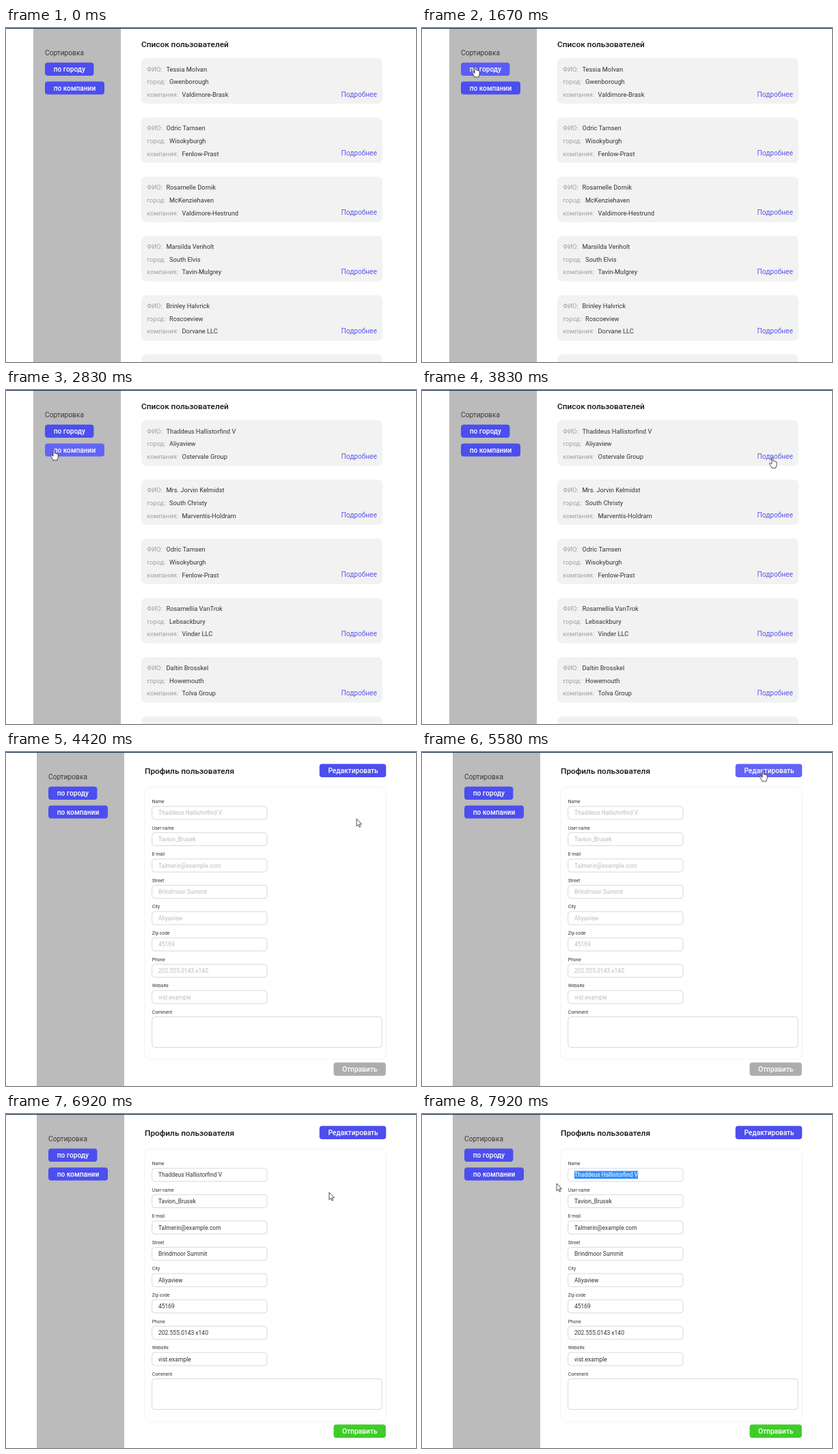
These frames come from a looping animation (600 by 490 pixels, 8000 ms). An HTML page:

```html
<!DOCTYPE html>
<html lang="ru">
<head>
<meta charset="utf-8">
<title>Список пользователей</title>
<style>
html, body { margin: 0; width: 100%; height: 100%; overflow: hidden; background: #fff; }
svg { display: block; width: 100%; height: 100%; font-family: Roboto, Arial, sans-serif; }
text { white-space: pre; }
</style>
</head>
<body>
<svg id="stage" viewBox="0 0 600 490"></svg>
<script>
const LOOP = 8000;
const T = { show: 500, byCity: 1750, byCompany: 2620, open: 4330, edit: 5720, drag: 7600 };
const BLUE = [76, 78, 239], LIGHT = [98, 100, 246], GREY = [173, 173, 173], GREEN = [63, 204, 41];
const NS = "http://www.w3.org/2000/svg";
const stage = document.getElementById("stage");

function add(parent, tag, attrs, content) {
  const node = document.createElementNS(NS, tag);
  for (const key in attrs) node.setAttribute(key, attrs[key]);
  if (content !== undefined) node.textContent = content;
  parent.appendChild(node);
  return node;
}
const box = (p, x, y, width, height, rx, fill, more) =>
  add(p, "rect", { x, y, width, height, rx, fill, ...more });
const label = (p, x, y, size, fill, str, weight = 400) =>
  add(p, "text", { x, y, "font-size": size, fill, "font-weight": weight }, str);
const show = (node, on) => node.setAttribute("display", on ? "inline" : "none");
const mix = (a, b, k) => `rgb(${a.map((v, i) => Math.round(v + (b[i] - v) * k))})`;
const clamp = v => Math.max(0, Math.min(1, v));

// Buttons keep their hit area for the pointer
function button(p, x, y, w, h, str) {
  const rect = box(p, x, y, w, h, 4, mix(BLUE, BLUE, 0));
  label(p, x + 12.7, y + h / 2 + 3.6, 10.15, "#fff", str, 500);
  return { rect, x, y, w, h };
}

function sidebar(p, x) {
  box(p, x, 0, 128, 490, 0, "#bbb");
  label(p, x + 17, 39.7, 10.2, "#3a3a3a", "Сортировка");
  return [
    button(p, x + 17, 50.8, 71.4, 19.2, "по городу"),
    button(p, x + 17, 78.4, 87, 19.2, "по компании")
  ];
}

const users = [
  ["Tessia Molvan", "Gwenborough", "Valdimore-Brask"],
  ["Odric Tamsen", "Wisokyburgh", "Fenlow-Prast"],
  ["Rosamelle Dornik", "McKenziehaven", "Valdimore-Hestrund"],
  ["Marsilda Venholt", "South Elvis", "Tavin-Mulgrey"],
  ["Brinley Halvrick", "Roscoeview", "Dorvane LLC"],
  ["Mrs. Jorvin Kelmidst", "South Christy", "Marventis-Holdram"],
  ["Daltin Brosskel", "Howemouth", "Tolva Group"],
  ["Thaddeus Hallistorfind V", "Aliyaview", "Ostervale Group"],
  ["Mirtha Kolvenby", "Bartholomebury", "Trel and Sons"],
  ["Rosamellia VanTrok", "Lebsackbury", "Vinder LLC"]
];
const orders = [[0, 1, 2, 3, 4], [7, 8, 0, 6, 9], [7, 5, 1, 9, 6]];

// User list
const list = add(stage, "g", {});
const listButtons = sidebar(list, 40);
label(list, 198, 28.2, 11.8, "#111", "Список пользователей", 500);
const rows = [["ФИО:", 234.5], ["город:", 239], ["компания:", 257.5]];
const links = [], cells = [];
for (let i = 0; i < 6; i++) {
  const y = 44.3 + 86.9 * i;
  box(list, 198, y, 353, 66.8, 7, "#f2f2f2");
  if (i === 5) break;
  cells.push(rows.map(([name, x], r) => {
    const base = y + 19.2 + 18.6 * r;
    label(list, 206.3, base, 9.3, "#a0a0a0", name);
    return label(list, x, base, 9.3, "#333", "");
  }));
  label(list, 490.5, y + 56.2, 10.15, "#5a58ec", "Подробнее");
  links.push({ x: 490, y: y + 46, w: 53, h: 14 });
}

// User profile
const profile = add(stage, "g", {});
const profileButtons = sidebar(profile, 45);
label(profile, 203, 31.6, 11.8, "#111", "Профиль пользователя", 500);
profileButtons.push(button(profile, 458.7, 17.6, 97.5, 19.4, "Редактировать"));
const send = button(profile, 479.4, 455.6, 76.4, 19.4, "Отправить").rect;
const frame = (x, y, w, h, r, stroke) =>
  box(profile, x, y, w, h, r, "#fff", { stroke, "stroke-width": 0.8 });
frame(203, 51.5, 353, 399.5, 8, "#efefef");
const form = [
  ["Name", users[7][0]],
  ["User name", "Tavion_Brusek"],
  ["E-mail", "Talmerin@example.com"],
  ["Street", "Brindmoor Summit"],
  ["City", "Aliyaview"],
  ["Zip code", "45169"],
  ["Phone", "202.555.0143 x140"],
  ["Website", "vist.example"]
];
const fields = [];
const values = form.map(([name, value], i) => {
  const y = 79.7 + 38.6 * i;
  label(profile, 213.8, y - 4.7, 6.7, "#333", name);
  frame(213.7, y, 168.2, 19.2, 4, "#cfcfcf");
  fields.push({ x: 213.7, y, w: 168.2, h: 19.2 });
  return label(profile, 223, y + 12.7, 8.5, "#bbb", value);
});
label(profile, 213.8, 383.8, 6.7, "#333", "Comment");
frame(213.7, 388.6, 336.4, 44.8, 4, "#cfcfcf");

// Text selection in the first field
const picked = add(profile, "g", {});
const clip = box(add(picked, "clipPath", { id: "pick" }), 0, 83.5, 0, 11.5, 0, "#000");
const mark = box(picked, 0, 83.5, 0, 11.5, 0, "#3390fb");
add(picked, "g", { "clip-path": "url(#pick)" })
  .appendChild(values[0].cloneNode(true)).setAttribute("fill", "#fff");

box(stage, 0, 0, 600, 1.1, 0, "#1d3050");

// Pointer
const pointer = add(stage, "g", { "stroke-linejoin": "round" });
const shapes = {
  arrow: add(pointer, "path", {
    d: "M0 0V10.8L2.5 8.5L4.1 12.2L5.8 11.5L4.2 7.9H7.6Z",
    fill: "#fff", stroke: "#222", "stroke-width": 0.8
  }),
  hand: add(pointer, "path", {
    d: "M-1 .8C-1-.3 1-.3 1 .8V6C1.2 5.3 2.8 5.5 2.8 6.4C3.2 5.8 4.5 6 4.5 7C5 6.5 6.2 6.8 6.2 7.8V11C6.2 13.5 5 14 5 16H-1.2C-1.5 14-4 11.5-4.4 9.6C-4.5 8.4-3.2 8.2-2.4 9L-1 10.4Z",
    fill: "#fff", stroke: "#222", "stroke-width": 0.8
  }),
  beam: add(pointer, "path", {
    d: "M-2-5H-.6L0-4.4L.6-5H2M0-4.4V4.4M-2 5H-.6L0 4.4L.6 5H2",
    fill: "none", stroke: "#222", "stroke-width": 0.8
  })
};

// Pointer path: time, x, y
const path = [
  [500, 395, 325], [830, 20, 232], [1080, 20, 232], [1250, 12, 180],
  [1450, 48, 90], [1600, 78, 56], [1920, 78, 56], [2400, 70, 87],
  [2830, 70, 87], [3150, 235, 226], [3500, 470, 160], [3850, 513, 98],
  [4600, 513, 98], [5050, 519, 58], [5460, 499, 27], [6250, 499, 27],
  [6600, 492, 88], [6920, 473, 115], [7150, 400, 112], [7480, 317, 90],
  [7600, 317, 90], [7830, 281, 92], [7920, 197, 102], [8000, 197, 102]
];

function slope(i, c) {
  const a = path[i - 1], b = path[i], d = path[i + 1];
  if (!a || !d) return 0;
  const before = (b[c] - a[c]) / (b[0] - a[0]), after = (d[c] - b[c]) / (d[0] - b[0]);
  return before * after <= 0 ? 0 : 2 * before * after / (before + after);
}

function position(t) {
  if (t <= path[0][0]) return path[0].slice(1);
  const i = path.findIndex((p, n) => n < path.length - 1 && t <= path[n + 1][0]);
  const a = path[i], b = path[i + 1], span = b[0] - a[0], u = (t - a[0]) / span;
  return [1, 2].map(c =>
    a[c] * (1 + 2 * u) * (1 - u) ** 2 + b[c] * u * u * (3 - 2 * u) +
    span * u * (1 - u) * (slope(i, c) * (1 - u) - slope(i + 1, c) * u));
}

const inside = ([x, y], r) => x >= r.x && x <= r.x + r.w && y >= r.y && y <= r.y + r.h;

// Share of the last 240 ms spent over the button, as its hover fade
function hover(t, r) {
  let sum = 0;
  for (let k = 0; k < 12; k++) sum += inside(position(t - 20 * k), r);
  return sum / 12;
}

let lastOrder = -1;
function draw(t) {
  const open = t >= T.open, editing = t >= T.edit;
  show(list, !open);
  show(profile, open);

  const order = (t >= T.byCity) + (t >= T.byCompany);
  if (order !== lastOrder) {
    cells.forEach((card, i) =>
      card.forEach((cell, c) => { cell.textContent = users[orders[order][i]][c]; }));
    lastOrder = order;
  }

  const buttons = open ? profileButtons : listButtons;
  for (const b of buttons) b.rect.setAttribute("fill", mix(BLUE, LIGHT, hover(t, b)));
  for (const v of values) v.setAttribute("fill", editing ? "#333" : "#bbb");
  send.setAttribute("fill", mix(GREY, GREEN, clamp((t - T.edit) / 300)));

  const at = position(t);
  const over = set => set.some(r => inside(at, r));
  const kind = over(buttons) || (!open && over(links)) ? "hand"
    : open && over(fields) ? "beam" : "arrow";
  show(pointer, t >= T.show);
  pointer.setAttribute("transform", `translate(${at[0].toFixed(2)} ${at[1].toFixed(2)})`);
  for (const name in shapes) show(shapes[name], name === kind);

  show(picked, t >= T.drag);
  if (t >= T.drag) {
    const name = values[0], end = 223 + name.getComputedTextLength();
    let start = end;
    for (let i = name.getNumberOfChars() - 1; i >= 0 && start > at[0]; i--) {
      start = name.getStartPositionOfChar(i).x;
    }
    for (const r of [clip, mark]) {
      r.setAttribute("x", start);
      r.setAttribute("width", Math.max(0, end - start));
    }
  }
}

const begin = performance.now();
function tick() {
  draw((performance.now() - begin) % LOOP);
  requestAnimationFrame(tick);
}
tick();
</script>
</body>
</html>
```
